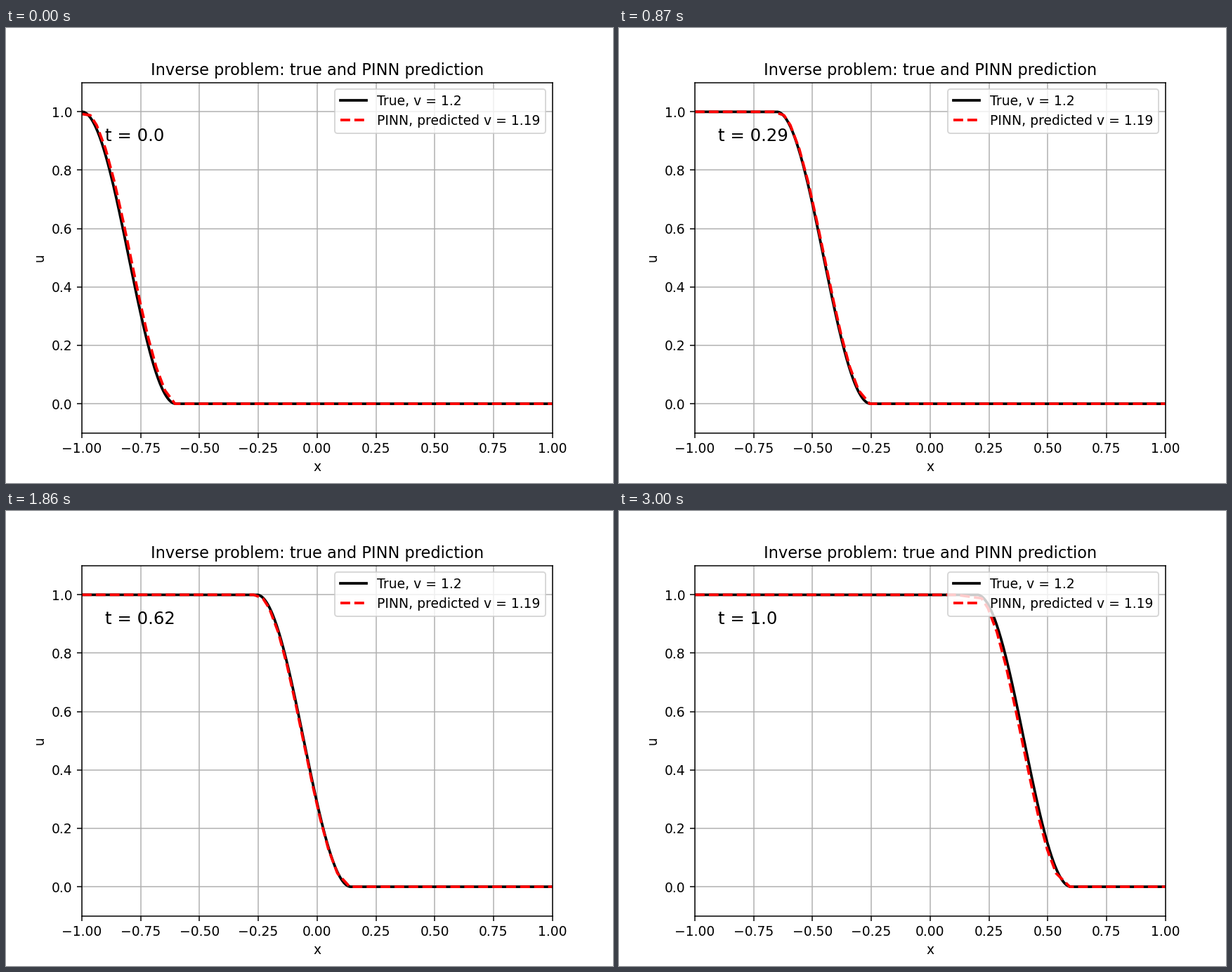
Write a matplotlib script that moves like this. It is 864 px wide and 648 px high and loops after 3.03 s.

```python
import numpy as np
import matplotlib.pyplot as plt
from matplotlib.animation import FuncAnimation

FRAMES = 101
SPEED = 1.2
WIDTH = 0.4  # length of the cosine slope

x = np.linspace(-1, 1, 1001)
# Corners of the piecewise linear prediction, measured from the wave's top
corners = np.array([0.028, 0.055, 0.093, 0.13, 0.165, 0.2,
                    0.235, 0.27, 0.307, 0.345])


def slope(s):
    return 0.5 * (1 + np.cos(np.pi * np.clip(s / WIDTH, 0, 1)))


def true_wave(t):
    return slope(x + 1 - SPEED * t)


def predicted_wave(t):
    top = SPEED * t - 1
    drift = 0.008 - 0.017 * t
    start = top - 0.005 - 0.28 * (t - 0.45) ** 2
    foot = top + 0.396 - 0.002 * t
    px = np.concatenate(([start], top + drift + corners, [foot]))
    pu = np.concatenate(([1], slope(corners), [0]))
    return np.interp(x, px, pu)


plt.rcParams["font.family"] = "DejaVu Sans"
fig, ax = plt.subplots(figsize=(6.4, 4.8), dpi=135)
true_line, = ax.plot(x, true_wave(0), color="black", lw=2,
                     label="True, v = 1.2")
pred_line, = ax.plot(x, predicted_wave(0), "--", color="red", lw=2,
                     label="PINN, predicted v = 1.19")
clock = ax.text(-0.9, 0.9, "t = 0.0", fontsize=13)

ax.set(xlim=(-1, 1), ylim=(-0.1, 1.1), xlabel="x", ylabel="u",
       title="Inverse problem: true and PINN prediction")
ax.grid(True)
ax.legend(loc="upper right")


def update(i):
    t = i / (FRAMES - 1)
    true_line.set_ydata(true_wave(t))
    pred_line.set_ydata(predicted_wave(t))
    clock.set_text(f"t = {round(t, 2)}")
    return true_line, pred_line, clock


anim = FuncAnimation(fig, update, frames=FRAMES, interval=30,
                     repeat=True, repeat_delay=0)
plt.show()
```
